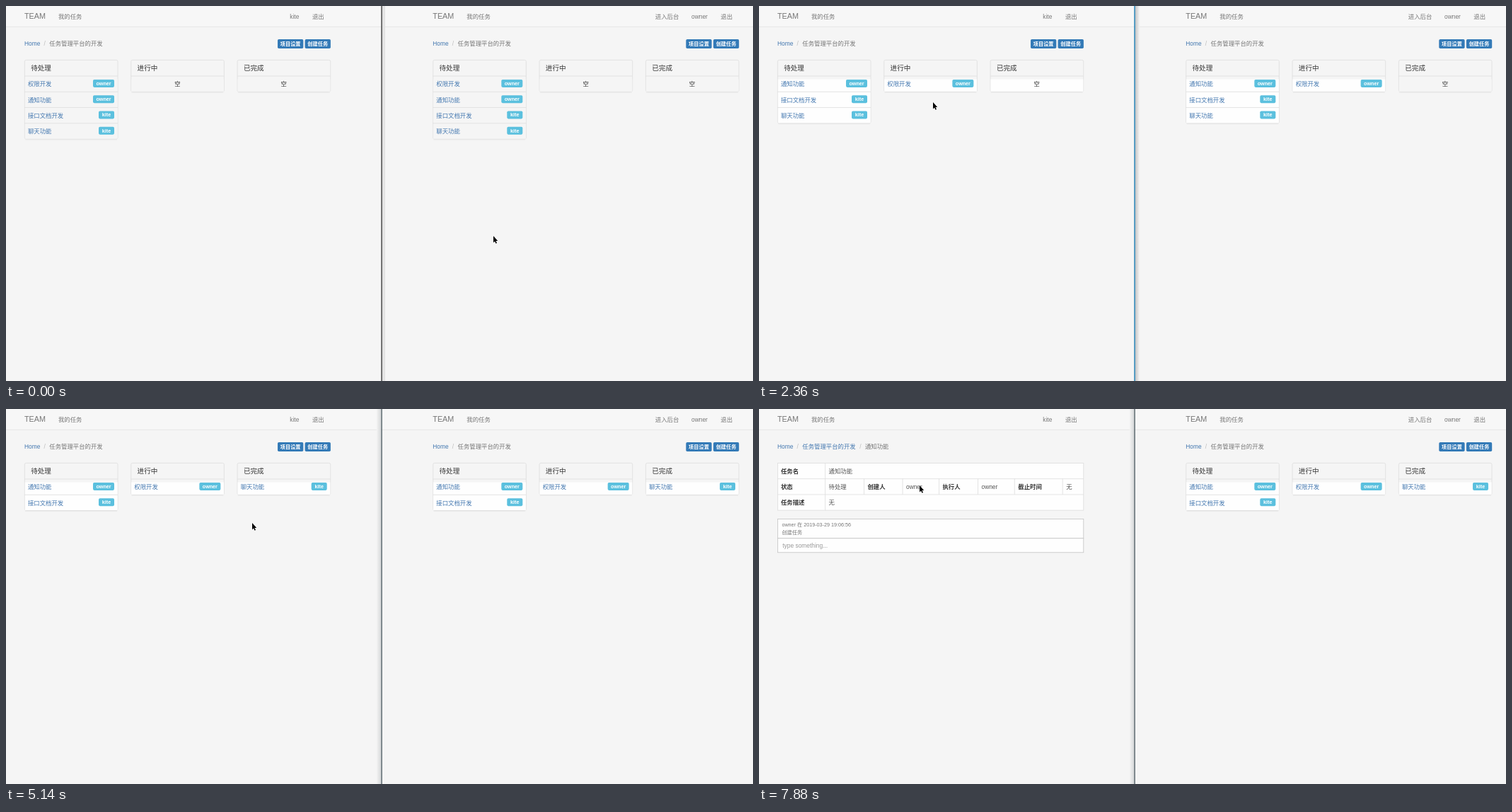
Animation, 1056 px wide and 530 px high, one loop 8000 ms. Source, as an HTML page:

```html
<!DOCTYPE html>
<html>
<head>
<meta charset="utf-8">
<title>Task board</title>
<style>
html, body { margin: 0; width: 100%; height: 100%; overflow: hidden; background: #f5f5f5; }
svg { display: block; }
text { font-family: "Liberation Sans", "Noto Sans CJK SC", "Noto Sans CJK", sans-serif; white-space: pre; }
</style>
</head>
<body>
<svg id="stage" width="1056" height="530" viewBox="0 0 1056 530">
  <defs>
    <linearGradient id="shadeLeft"><stop offset="0" stop-color="#f3f3f3"/><stop offset="1" stop-color="#d6d8d9"/></linearGradient>
    <linearGradient id="shadeRight"><stop offset="0" stop-color="#c4c4c4"/><stop offset="1" stop-color="#f5f5f5"/></linearGradient>
  </defs>
</svg>
<script>
const LOOP = 8000, TICK = 137;
const RIGHT = 577.3, MARGIN = 26, WIDTH = 433;
const ROW = 22.25, PANEL = 132, PANEL_GAP = 150.35;
const BLUE = '#4478b0', GRAY = '#777', DARK = '#333', PAPER = '#fefefe', PALE = '#f5f5f5';
const OWNER = 'owner', MEMBER = 'kite';
const bold = 'font-weight="700"', centered = 'text-anchor="middle"';
const stage = document.getElementById('stage');

const text = (x, mid, str, fill = GRAY, size = 8.4, extra = '') =>
  `<text x="${x}" y="${mid + size * 0.36}" font-size="${size}" fill="${fill}" ${extra}>${str}</text>`;
const box = (x, y, w, h, fill, stroke = 'none', r = 0) =>
  `<rect x="${x}" y="${y}" width="${w}" height="${h}" rx="${r}" fill="${fill}" stroke="${stroke}" stroke-width=".8"/>`;
const line = (x1, y1, x2, y2, color = '#ddd') =>
  `<path d="M${x1} ${y1}L${x2} ${y2}" stroke="${color}" stroke-width=".8"/>`;
const badge = (x, mid, w, h, str, fill) =>
  box(x, mid - h / 2, w, h, fill, 'none', 1.8) +
  text(x + w / 2, mid - 0.2, str, '#fff', 7.2, `${bold} ${centered}`);

function group(html, dx = 0) {
  const g = document.createElementNS('http://www.w3.org/2000/svg', 'g');
  g.setAttribute('transform', `translate(${dx} 0)`);
  g.innerHTML = html;
  stage.append(g);
  return g;
}

// Board page
const owners = { 权限开发: OWNER, 通知功能: OWNER, 接口文档开发: MEMBER, 聊天功能: MEMBER };
const titles = ['待处理', '进行中', '已完成'];
const project = '任务管理平台的开发';
const home = text(MARGIN, 53, 'Home', BLUE) + text(53.5, 53, '/', '#bbb');

function panel(x, title, tasks, fill) {
  const top = 99, bottom = top + ROW * Math.max(1, tasks.length);
  let out = line(x + 1, bottom + 0.9, x + PANEL - 1, bottom + 0.9, '#e6e6e6') +
    box(x + 0.4, 76.4, PANEL - 0.4, bottom - 76.4, PALE, '#ddd', 2) +
    box(x + 0.8, 103.5, PANEL - 1.2, bottom - 104, fill) +
    line(x, top, x + PANEL, top) + text(x + 9.2, 87.5, title, DARK, 9.6);
  if (!tasks.length) out += text(x + PANEL / 2, 110.4, '空', DARK, 8.4, centered);
  tasks.forEach((task, i) => {
    const y = top + ROW * i, w = owners[task] === OWNER ? 30 : 22;
    if (i) out += line(x, y, x + PANEL, y);
    out += text(x + 5, y + 11.4, task, BLUE) +
      badge(x + PANEL - 5 - w, y + 10.4, w, 11, owners[task], '#5bc0de');
  });
  return out;
}

const board = (lists, rowFill, emptyFill = rowFill) =>
  home + text(61.3, 53, project) +
  badge(384, 53.5, 36.3, 13, '项目设置', '#337ab7') +
  badge(422.6, 53.5, 36.3, 13, '创建任务', '#337ab7') +
  lists.map((tasks, i) =>
    panel(MARGIN + PANEL_GAP * i, titles[i], tasks, tasks.length ? rowFill : emptyFill)).join('');

const move = (lists, task, to) => lists.map((list, i) =>
  i === to ? [...list, task] : list.filter(t => t !== task));

// Task page
const taskHead = home + text(61.3, 53, project, BLUE) +
  text(142.3, 53, '/', '#bbb') + text(150, 53, '通知功能');
const input = (y, fill) => box(MARGIN + 0.4, y, WIDTH - 0.6, 20, fill, '#c4c4c4') +
  text(33.3, y + 10, 'type something...', '#999');

function detail() {
  const columns = [26, 93.6, 148.5, 203, 254.5, 309.5, 361.3, 429.2];
  const rows = [
    ['任务名', '通知功能'],
    ['状态', '待处理', '创建人', OWNER, '执行人', OWNER, '截止时间', '无'],
    ['任务描述', '无']
  ];
  let out = box(MARGIN + 0.4, 76.4, WIDTH - 0.6, ROW * 3, PAPER, '#ddd');
  rows.forEach((cells, r) => {
    const y = 76.4 + ROW * r;
    if (r) out += line(MARGIN, y, MARGIN + WIDTH, y);
    cells.forEach((str, c) => {
      const x = columns[c], head = c % 2 === 0;
      if (c) out += line(x, y, x, y + ROW);
      out += text(x + 5, y + ROW / 2, str, head ? DARK : '#555', 8.4, head ? bold : '');
    });
  });
  return out + box(MARGIN + 0.4, 155.4, WIDTH - 0.6, 27.4, PAPER, '#c4c4c4') +
    text(32.4, 163.6, `${OWNER} 在 2019-03-29 19:06:56`, GRAY, 7.2) +
    text(32.4, 174, '创建任务', GRAY, 7.2) + input(182.8, PAPER);
}

// Navigation
const brand = text(MARGIN, 14.5, 'TEAM', GRAY, 10.8) + text(74, 14.5, '我的任务') +
  text(433, 14.5, '退出');
group(box(0, 0, 1056, 29, '#f7f7f7') + line(0, 29.4, 1056, 29.4, '#e5e5e5'));
group(brand + text(401.3, 14.5, MEMBER));
group(brand + text(340.5, 14.5, '进入后台') + text(391.8, 14.5, OWNER), RIGHT);

const start = [Object.keys(owners), [], []];
const begun = move(start, '权限开发', 1);
const ended = move(begun, '聊天功能', 2);

const leftViews = [
  board(start, PALE), board(begun, PAPER), board(ended, PAPER),
  taskHead + input(76.4, '#f7f7f7'), taskHead + detail()
].map(html => group(html));
const rightViews = [
  board(start, PALE), board(begun, PAPER, PALE), board(ended, PAPER)
].map(html => group(html, RIGHT));

const edge = color => box(530.3, 0, 1.5, 530, color);
const dividers = [
  box(532, 0, 4, 530, '#e4e4e4') + edge('#484848'),
  box(524, 0, 6, 530, 'url(#shadeLeft)') + edge('#59666c'),
  box(532, 0, 6, 530, 'url(#shadeRight)') + edge('#217fb4')
].map(html => group(html));

const cursor = group('<path d="M0 0V9.4L2 7.5 3.5 10.7 5 10 3.5 6.9H6.2Z" stroke="#fff" stroke-width=".5" paint-order="stroke"/>');

// Two drops, then the task page opens and loads
const changes = [2240, 4000, 5800, 6460];
// Focus passes between the windows
const focus = [258, 1660, 3040, 5670, 7480];
// Pointer legs: start, end, target x, target y
const legs = [
  [120, 810, 285, 280], [1090, 1240, 226, 220], [1390, 1660, 52, 108],
  [1800, 2360, 246, 136], [2510, 3040, 682, 170], [3170, 3590, 684, 153],
  [3740, 4000, 945, 118], [4140, 4280, 898, 195], [4720, 4840, 500, 176],
  [5140, 5140, 348, 161], [5270, 5670, 50, 108], [5800, 6190, 222, 152],
  [6740, 7200, 677, 165], [7480, 7880, 227, 108]
];

// The pointer advances in equal jumps, the first one at the start of a leg
function pointer(t) {
  let x = 689, y = 325;
  for (const [from, to, toX, toY] of legs) {
    if (t < from) break;
    const jumps = Math.round((to - from) / TICK);
    const done = t >= to ? jumps : Math.floor((t - from) / (to - from) * jumps);
    const p = (done + 1) / (jumps + 1);
    x += (toX - x) * p;
    y += (toY - y) * p;
  }
  return [x, y];
}

const passed = (times, t) => times.filter(time => time <= t).length;
const show = (views, index) =>
  views.forEach((g, i) => { g.style.display = i === index ? '' : 'none'; });

function draw(t) {
  const step = passed(changes, t), turn = passed(focus, t);
  show(leftViews, step);
  show(rightViews, Math.min(step, 2));
  show(dividers, turn && 2 - turn % 2);
  cursor.setAttribute('transform', `translate(${pointer(t).map(Math.round).join(' ')})`);
}

const origin = performance.now();
function tick() {
  draw((performance.now() - origin) % LOOP);
  requestAnimationFrame(tick);
}
tick();
</script>
</body>
</html>
```
